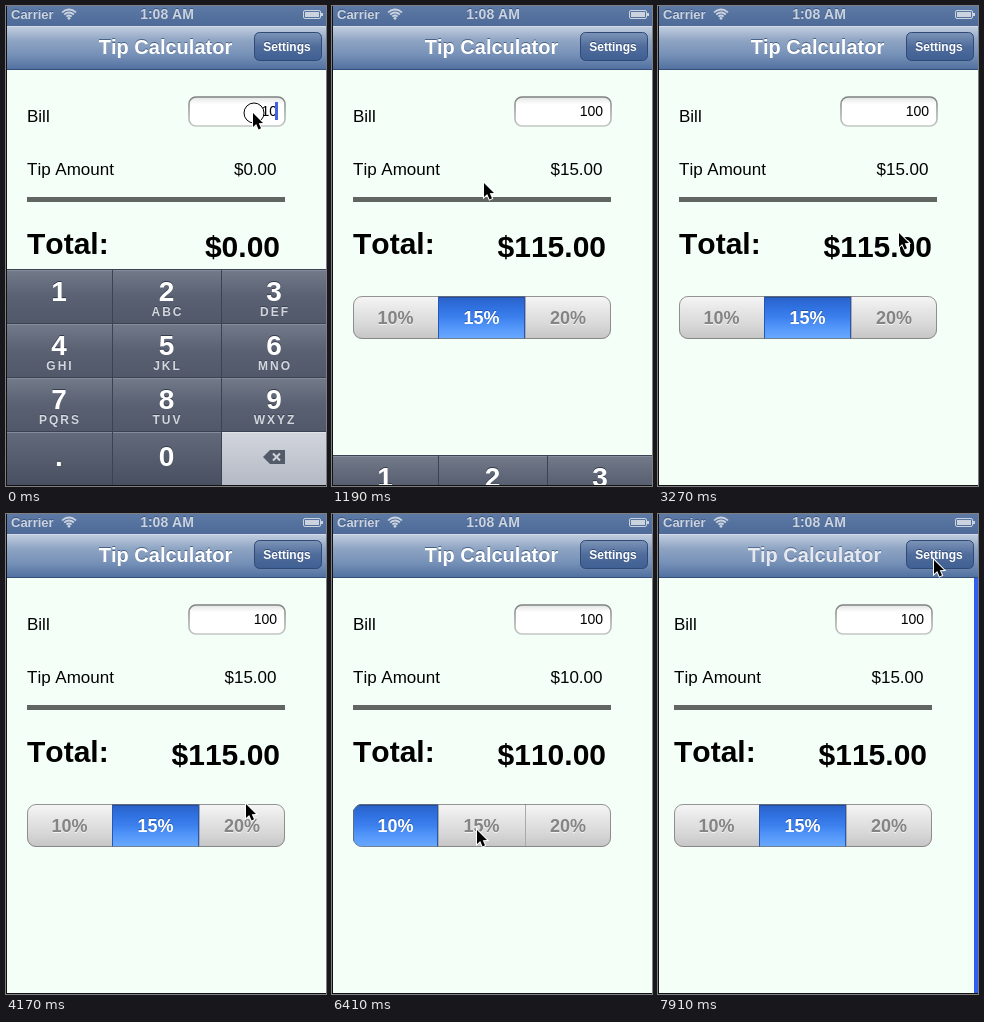
An HTML page with a canvas for the animation above (8000 ms loop, 320 px wide and 480 px high).

```html
<!DOCTYPE html>
<html lang="en">
<head>
<meta charset="utf-8">
<title>Tip Calculator</title>
<style>
html, body { margin: 0; width: 100%; height: 100%; overflow: hidden; background: #f4fff7; }
canvas { display: block; }
</style>
</head>
<body>
<canvas id="stage" width="320" height="480"></canvas>
<script>
const ctx = document.getElementById('stage').getContext('2d');
const LOOP = 8000, TICK = 149.2;

// [tick, x, y] of the pointer tip, straight lines in between
const pointerPath = [
  [0, 247, 107], [2, 247, 107], [5, 152, 177], [10, 152, 177], [13, 152, 286], [14, 152, 286],
  [17, 224, 310], [21, 224, 310], [24, 276, 62], [25, 276, 62], [28, 240, 290], [31, 240, 290],
  [35, 105, 312], [37, 66, 314], [40, 66, 314], [43, 145, 316], [47, 145, 316], [51, 276, 46], [53, 276, 46]
];
const clickTicks = [0, 6, 29, 37, 45, 52];
// [first tick, selected percentage]
const choices = [[0, 15], [30, 20], [38, 10], [46, 15]];
const keys = [['1', ''], ['2', 'ABC'], ['3', 'DEF'], ['4', 'GHI'], ['5', 'JKL'], ['6', 'MNO'],
  ['7', 'PQRS'], ['8', 'TUV'], ['9', 'WXYZ'], ['.', ''], ['0', '']];

function vertical(y0, y1, ...colors) {
  const g = ctx.createLinearGradient(0, y0, 0, y1);
  colors.forEach((c, i) => g.addColorStop(i / (colors.length - 1), c));
  return g;
}
function rect(x, y, w, h, fill) {
  ctx.fillStyle = fill;
  ctx.fillRect(x, y, w, h);
}
function rounded(x, y, w, h, r) {
  ctx.beginPath();
  ctx.roundRect(x, y, w, h, r);
}
function text(str, x, y, size, color, { bold = true, align = 'left', spacing = 0, shadow, dy = -1 } = {}) {
  ctx.font = `${bold ? 'bold ' : ''}${size}px "Liberation Sans", Arial, sans-serif`;
  ctx.fontKerning = 'none';
  ctx.letterSpacing = spacing + 'px';
  ctx.textAlign = align;
  if (shadow) {
    ctx.fillStyle = shadow;
    ctx.fillText(str, x, y + dy);
  }
  ctx.fillStyle = color;
  ctx.fillText(str, x, y);
}

function pointerAt(tick) {
  const i = pointerPath.findIndex(p => p[0] > tick);
  if (i < 0) return pointerPath.at(-1).slice(1);
  const [t0, x0, y0] = pointerPath[i - 1], [t1, x1, y1] = pointerPath[i];
  const k = (tick - t0) / (t1 - t0);
  return [Math.round(x0 + (x1 - x0) * k), Math.round(y0 + (y1 - y0) * k)];
}

function drawStatusBar() {
  rect(0, 0, 320, 20, vertical(0, 20, '#5d7aa6', '#4d6a98'));
  const pale = '#cbd3df', shade = '#3c5681';
  text('Carrier', 5, 13, 13, pale, { shadow: shade });
  text('1:08 AM', 161, 13, 14, pale, { align: 'center', shadow: shade });
  ctx.strokeStyle = pale;
  ctx.lineWidth = 1.8;
  for (const r of [3.5, 6.5, 9.5]) {
    ctx.beginPath();
    ctx.arc(63, 13, r, -Math.PI * 0.76, -Math.PI * 0.24);
    ctx.stroke();
  }
  ctx.beginPath();
  ctx.arc(63, 12.3, 1.4, 0, 7);
  ctx.fillStyle = pale;
  ctx.fill();
  ctx.lineWidth = 1;
  rounded(297.5, 4.5, 17, 8, 1.5);
  ctx.stroke();
  rect(299, 6, 14, 5, pale);
  rect(315, 7, 2, 3, pale);
}

function drawNavBar(titleShift, pressed) {
  rect(0, 20, 320, 44, vertical(20, 64, '#c3cfe0', '#8ea4c3', '#7590b7', '#506f9f'));
  rect(0, 20, 320, 1, '#d3dce8');
  rect(0, 63, 320, 1, '#344f7c');
  ctx.globalAlpha = titleShift ? 0.85 : 1;
  text('Tip Calculator', 159.5 + titleShift, 48, 20, '#fff', { align: 'center', shadow: '#4c6388' });
  ctx.globalAlpha = 1;
  rounded(248.5, 26.5, 67, 28, 5);
  ctx.fillStyle = pressed ? vertical(26, 55, '#4a638d', '#213e73') : vertical(26, 55, '#7f96b9', '#4f6c9b', '#3f5f93');
  ctx.fill();
  ctx.strokeStyle = '#304a75';
  ctx.stroke();
  text('Settings', 281, 45, 12, '#fff', { align: 'center', shadow: '#314a73' });
}

function drawField(bill, caret) {
  rounded(183, 91, 96, 29, 7);
  ctx.fillStyle = vertical(91, 120, '#e2e4e3', '#fff', '#fff', '#fff', '#fff');
  ctx.fill();
  ctx.lineWidth = 1.6;
  ctx.strokeStyle = vertical(91, 120, '#7e8280', '#a4a8a6', '#c2c7c4');
  ctx.stroke();
  ctx.lineWidth = 1;
  text(bill, 271, 110, 14, '#000', { bold: false, align: 'right' });
  if (caret) rect(269, 96, 3, 18, '#4362e4');
}

function drawSegments(selected) {
  ctx.save();
  rounded(21, 290, 258, 43, 9);
  ctx.clip();
  [[10, 21, 85], [15, 106, 87], [20, 193, 86]].forEach(([percent, x, w]) => {
    const on = percent === selected;
    rect(x, 290, w, 43, on
      ? vertical(290, 333, '#2a5fc4', '#2f70df', '#3c80ee', '#5598fa', '#69a9ff')
      : vertical(290, 333, '#f6f6f6', '#e6e6e6', '#d8d8d8', '#c5c5c5'));
    if (on) {
      rect(x, 290, w, 2, '#244f9f');
      rect(x, 290, 1, 43, '#2757b4');
      rect(x + w - 1, 290, 1, 43, '#2757b4');
    } else if (x > 21) {
      rect(x, 290, 1, 43, '#aaa');
    }
    text(percent + '%', x + w / 2, 318, 18, on ? '#fff' : '#848484',
      { align: 'center', shadow: on ? '#2558b3' : '#f4f4f4', dy: on ? -1 : 1 });
  });
  ctx.restore();
  rounded(21.5, 290.5, 257, 42, 8.5);
  ctx.strokeStyle = 'rgba(115,115,115,.75)';
  ctx.stroke();
}

function drawForm(bill, caret, tip, selected) {
  const amount = n => '$' + n.toFixed(2);
  const label = { bold: false }, right = { align: 'right' };
  text('Bill', 21, 116, 17, '#000', label);
  drawField(bill, caret);
  text('Tip Amount', 21, 169, 17, '#000', label);
  text(amount(tip), 270.5, 169, 17, '#000', { ...label, ...right });
  rect(21, 191, 258, 5, '#626662');
  text('Total:', 21, 248, 30, '#000');
  text(amount(tip && 100 + tip), 274, 251, 30, '#000', right);
  drawSegments(selected);
}

function drawKeyboard(offset) {
  ctx.save();
  ctx.translate(0, offset);
  rect(0, 263, 320, 217, '#3b4251');
  for (let i = 0; i < 12; i++) {
    const col = i % 3, row = Math.floor(i / 3);
    const x = [1, 107, 216][col], w = [105, 108, 104][col], y = 264 + row * 54;
    const cx = [53, 160.5, 268][col], erase = i === 11;
    rect(x, y, w, 53, erase ? vertical(y, y + 53, '#d2d5dc', '#b4b9c4')
      : row === 3 ? vertical(y, y + 53, '#626a7b', '#484f60')
      : vertical(y, y + 53, '#737a8a', '#596172', '#505869'));
    rect(x, y, w, 1, erase ? '#e2e4e9' : '#858c9a');
    if (erase) {
      drawEraseIcon(cx, y + 25);
      continue;
    }
    const [digit, letters] = keys[i];
    text(digit, cx, y + (row === 3 ? 34 : 31), 28, '#fff', { align: 'center', shadow: '#353c4b' });
    text(letters, cx + 1, y + 46, 12, '#d3d6dc', { align: 'center', spacing: 2, shadow: '#3c4352' });
  }
  ctx.restore();
}

function drawEraseIcon(cx, cy) {
  ctx.beginPath();
  for (const [x, y] of [[-11, 0], [-4, -7], [11, -7], [11, 7], [-4, 7]]) ctx.lineTo(cx + x, cy + y);
  ctx.closePath();
  ctx.fillStyle = '#535b6b';
  ctx.fill();
  ctx.beginPath();
  for (const s of [-1, 1]) {
    ctx.moveTo(cx - 1, cy - 3.5 * s);
    ctx.lineTo(cx + 6, cy + 3.5 * s);
  }
  ctx.strokeStyle = '#d0d3da';
  ctx.lineWidth = 2;
  ctx.stroke();
  ctx.lineWidth = 1;
}

function drawPointer([x, y], clicking) {
  if (clicking) {
    ctx.beginPath();
    ctx.arc(x + 1, y, 10, 0, 7);
    ctx.fillStyle = '#fff';
    ctx.fill();
    ctx.strokeStyle = '#000';
    ctx.stroke();
  }
  ctx.beginPath();
  for (const [dx, dy] of [[0, 0], [0, 14], [3.2, 11], [5.6, 16.4], [8, 15.3], [5.7, 10.2], [10, 10]]) {
    ctx.lineTo(x + dx, y + dy);
  }
  ctx.closePath();
  ctx.lineWidth = 2;
  ctx.strokeStyle = '#fff';
  ctx.stroke();
  ctx.lineWidth = 1;
  ctx.fillStyle = '#000';
  ctx.fill();
}

function draw(now) {
  const tick = Math.min(53, Math.floor((now % LOOP + 15) / TICK));
  const selected = choices.findLast(c => c[0] <= tick)[1];
  const leaving = tick === 53;

  rect(0, 0, 320, 480, '#f4fff7');
  ctx.save();
  if (leaving) ctx.translate(-5, 0);
  drawForm(tick < 1 ? '10' : '100', tick < 6, tick < 6 ? 0 : selected, selected);
  ctx.restore();
  if (leaving) rect(316, 64, 4, 416, '#315fee');

  // The keyboard eases out over about 250 ms
  if (tick < 9) drawKeyboard(tick < 7 ? 0 : tick === 7 ? 12 : 186);
  drawStatusBar();
  drawNavBar(leaving ? -3 : 0, tick === 52);
  rect(0, 0, 1, 480, '#111');
  rect(0, 479, 320, 1, '#111');
  drawPointer(pointerAt(tick), clickTicks.includes(tick));
}

const start = performance.now();
(function frame() {
  draw(performance.now() - start);
  requestAnimationFrame(frame);
})();
</script>
</body>
</html>
```
